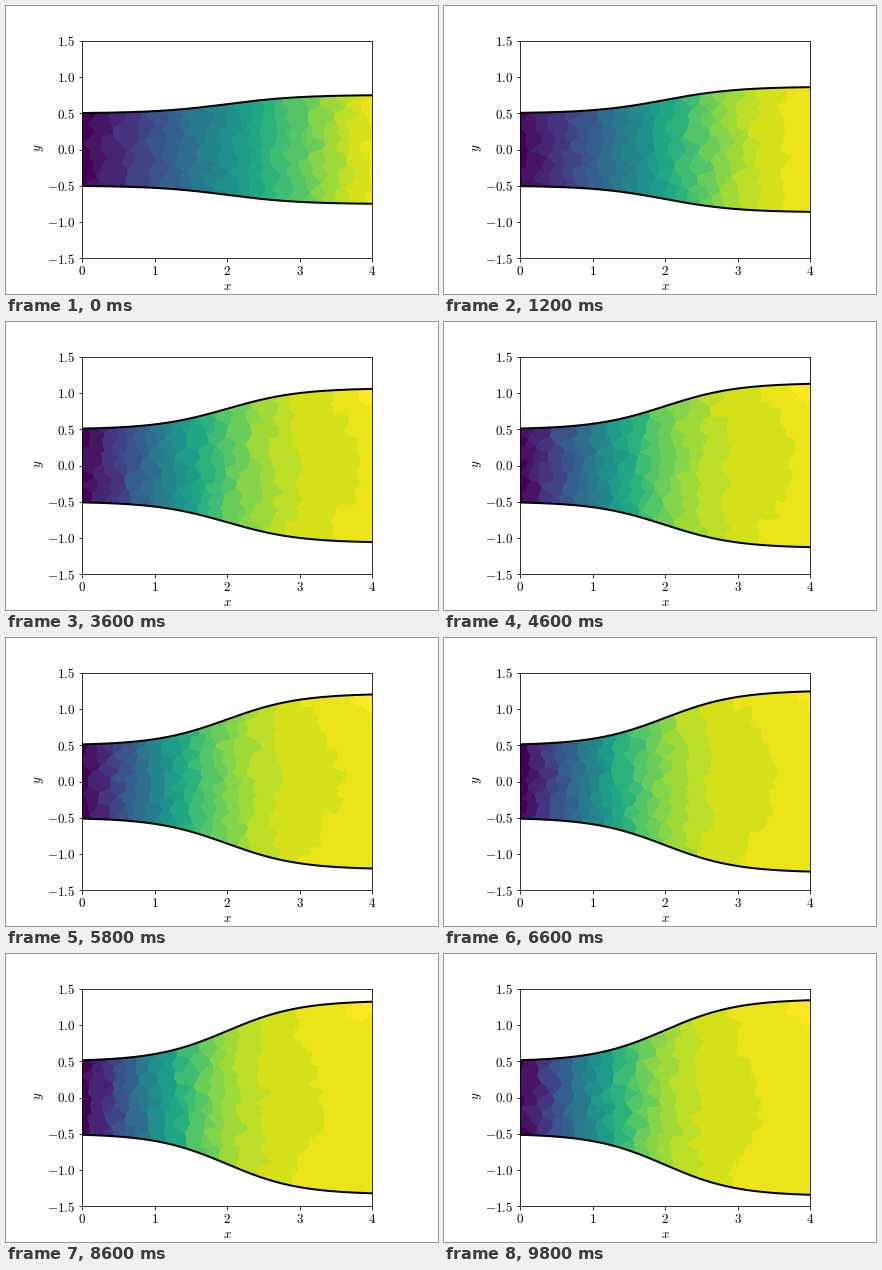
Recreate the animation shown at these times as a matplotlib script. Size 432 by 288 pixels, loop 10000 ms.

```python
import numpy as np
import matplotlib.pyplot as plt
from matplotlib.animation import FuncAnimation

W, H, DPI = 432, 288, 72
FRAMES, STEP = 50, 200
LEFT, RIGHT, TOP, BOTTOM = 76, 366, 35, 252
NX, NY = RIGHT - LEFT, BOTTOM - TOP
CELL = 0.17

plt.rcParams.update({"mathtext.fontset": "cm", "font.size": 13})

# colour steps, slightly finer towards the bright end
LEVELS = 1 - (1 - np.arange(23) / 22) ** 1.15
EDGES = (LEVELS[1:] + LEVELS[:-1]) / 2

GX, GY = np.meshgrid((np.arange(NX) + 0.5) * 4 / NX,
                     (np.arange(NY) + 0.5) * 3 / NY - 1.5)
PIXELS = np.column_stack([GX.ravel(), GY.ravel()]).astype(np.float32)
XS = np.linspace(0, 4, 200)


def ease_out(i, power):
    return 1 - (1 - i / (FRAMES - 1)) ** power


def ramp(v, start, width):
    return np.clip((v - start) / width, 0, 1)


def wall(x, i):
    """Half height of the channel, opening over time."""
    outlet = 0.75 + 0.595 * ease_out(i, 1.6)
    return 0.5 + (outlet - 0.5) * (1 + np.tanh(x - 2)) / (1 + np.tanh(2))


def value(x, y, i):
    """Linear rise along x that levels off earlier as the channel opens."""
    u = x * (0.25 + 0.25 * ease_out(i, 1.9))
    n = 5.5 + 20 * np.exp(-i / 5)
    top = 0.965 + 0.03 * np.exp(-i / 5)
    s = y / wall(x, i)
    side = 0.014 * ramp(x, 2.4, 0.6) * np.minimum(s**2, 1)
    corner = 0.03 * ramp(x, 3.6, 0.25) * ramp(s, 0.7, 0.2)
    return top * u / (1 + u**n) ** (1 / n) + min(i / 18, 1) * (side + corner)


def cells(i):
    """Jittered, staggered cell centres inside the channel."""
    rng = np.random.default_rng(100 + i)
    cx, cy = np.meshgrid(np.arange(0, 4 + CELL, CELL), np.arange(-1.4, 1.45, CELL))
    cy = cy + CELL / 2 * (np.arange(cx.shape[1]) % 2)
    cx = cx + rng.uniform(-0.5, 0.5, cx.shape) * CELL
    cy = cy + rng.uniform(-0.5, 0.5, cy.shape) * CELL
    keep = np.abs(cy) < wall(cx, i) + CELL / 2
    return cx[keep], cy[keep]


def field(i):
    """Every pixel takes the stepped value of its nearest cell."""
    cx, cy = cells(i)
    pts = np.column_stack([cx, cy]).astype(np.float32)
    inside = np.abs(GY) <= wall(GX, i)
    score = PIXELS[inside.ravel()] @ pts.T - (pts**2).sum(axis=1) / 2
    shade = LEVELS[np.digitize(value(np.clip(cx, 0, 4), cy, i), EDGES)]
    out = np.full(GX.shape, np.nan)
    out[inside] = shade[score.argmax(axis=1)]
    return out


fig = plt.figure(figsize=(W / DPI, H / DPI), dpi=DPI, facecolor="white")
ax = fig.add_axes([LEFT / W, 1 - BOTTOM / H, NX / W, NY / H])
image = ax.imshow(field(0), extent=(0, 4, -1.5, 1.5), origin="lower", aspect="auto",
                  cmap="viridis", vmin=0, vmax=1, interpolation="nearest")
upper, = ax.plot([], [], "k", lw=2)
lower, = ax.plot([], [], "k", lw=2)

ax.set(xlim=(0, 4), ylim=(-1.5, 1.5))
ticks = np.arange(-1.5, 1.6, 0.5)
ax.set_xticks(range(5), [f"${n}$" for n in range(5)])
ax.set_yticks(ticks, [f"${t:.1f}$" for t in ticks])
fig.text(221 / W, 1 - 280 / H, "$x$", ha="center", va="center")
fig.text(34 / W, 1 - 142 / H, "$y$", ha="center", va="center", rotation=90)


def update(i):
    image.set_data(field(i))
    h = wall(XS, i)
    upper.set_data(XS, h)
    lower.set_data(XS, -h)
    return image, upper, lower


anim = FuncAnimation(fig, update, frames=FRAMES, interval=STEP,
                     init_func=lambda: update(0), repeat=True, repeat_delay=0)
plt.show()
```
